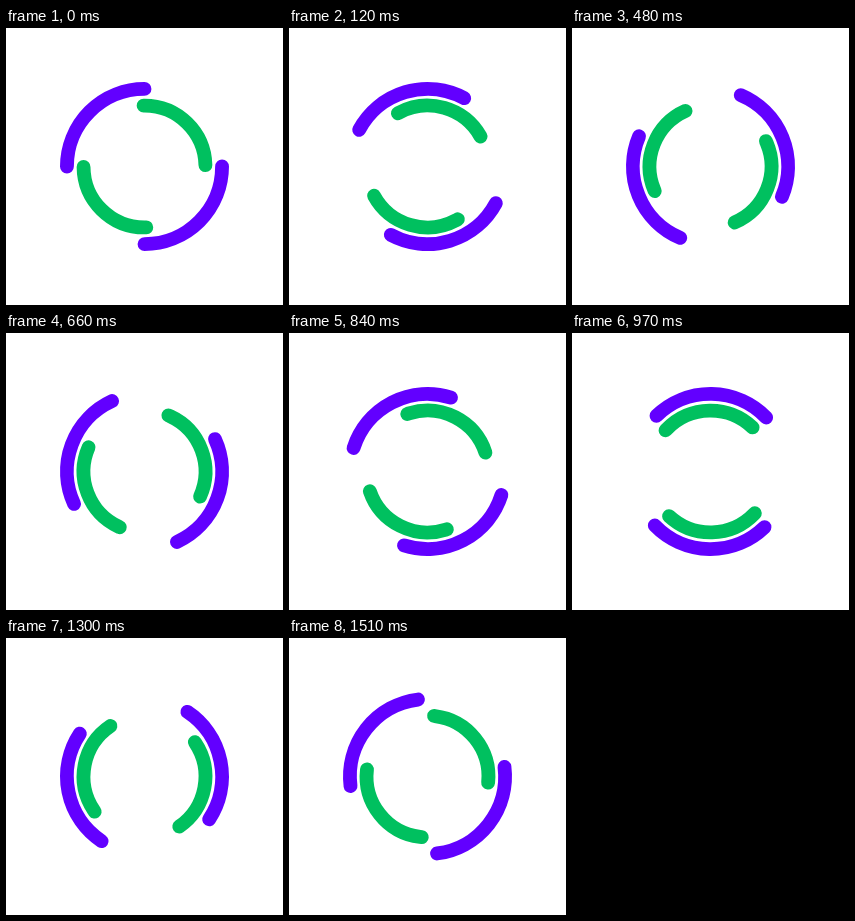
Recreate the animation shown at these times as an HTML page. Size 277 by 277 pixels, loop 1540 ms.

```html
<!DOCTYPE html>
<html lang="en">
<head>
<meta charset="utf-8">
<title>Double ring spinner</title>
<style>
  html, body { margin: 0; width: 100%; height: 100%; overflow: hidden; background: #fff; }
  svg { display: block; width: 100%; height: 100%; }
  circle { fill: none; stroke-width: 5; stroke-linecap: round; stroke-dasharray: 1 1; }
</style>
</head>
<body>
<svg viewBox="-50 -50 100 100">
  <circle id="outer" r="28" pathLength="4" stroke="#6200ff"/>
  <circle id="inner" r="22" pathLength="4" stroke="#00c05f"/>
</svg>
<script>
  const LOOP = 1540, STEPS = 51, STEP_MS = 30;
  const LONG_STEP = 30; // this step lasts 10 ms longer, filling the loop

  const outer = document.getElementById('outer');
  const inner = document.getElementById('inner');

  function stepAt(t) {
    const late = (LONG_STEP + 1) * STEP_MS + 10;
    return t < late
      ? Math.min(LONG_STEP, Math.floor(t / STEP_MS))
      : Math.floor((t - 10) / STEP_MS);
  }

  function draw() {
    const angle = stepAt(performance.now() % LOOP) * 360 / STEPS;
    outer.setAttribute('transform', `rotate(${angle})`);
    inner.setAttribute('transform', `rotate(${90 - angle})`);
    requestAnimationFrame(draw);
  }
  draw();
</script>
</body>
</html>
```
